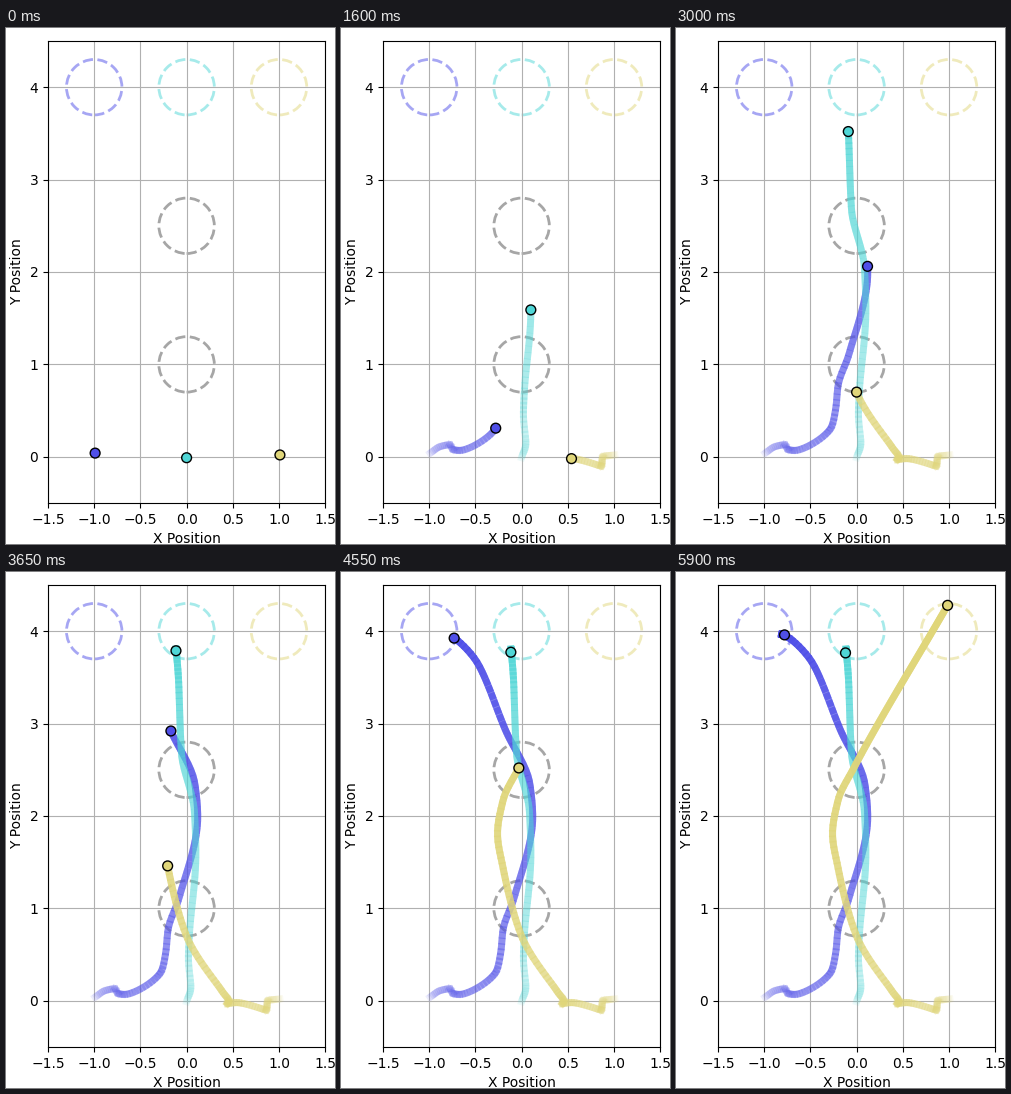
A matplotlib script for the animation above (5950 ms loop, 329 px wide and 516 px high).

```python
import numpy as np
import matplotlib.pyplot as plt
from matplotlib.animation import FuncAnimation
from matplotlib.collections import LineCollection

W, H, DPI = 329, 516, 100
FRAMES, STEP_MS = 119, 50

BLUE = (0.31, 0.31, 0.91)
CYAN = (0.31, 0.84, 0.84)
SAND = (0.88, 0.84, 0.48)
COLORS = [BLUE, CYAN, SAND]

# Waypoints: step, x, y
BLUE_WAY = [
    (0, -.99, .04), (6, -.88, .11), (11, -.78, .13), (15, -.74, .08),
    (19, -.67, .07), (32, -.28, .31), (37, -.225, .53), (41, -.20, .77),
    (47, -.08, 1.12), (59, .12, 1.99), (64, .09, 2.34), (73, -.17, 2.92),
    (84, -.50, 3.69), (91, -.73, 3.925), (96, -.81, 3.965), (118, -.78, 3.96),
]
CYAN_WAY = [
    (0, 0, -.01), (8, .045, .16), (14, .02, .46), (19, .03, .71),
    (32, .10, 1.59), (38, .085, 2.04), (47, -.055, 2.68), (60, -.09, 3.52),
    (69, -.115, 3.81), (75, -.115, 3.78), (118, -.12, 3.765),
]
SAND_WAY = [
    (0, 1.01, .02), (9, .88, 0), (19, .86, -.10), (32, .54, -.02),
    (37, .44, -.03), (41, .455, 0), (47, .38, .11), (60, 0, .70),
    (73, -.205, 1.46), (79, -.26, 1.81), (85, -.20, 2.17), (91, -.03, 2.52),
    (118, .985, 4.28),
]


def glide(points):
    """Monotone cubic curve through timed waypoints, sampled at each step."""
    data = np.array(points, float)
    t, p = data[:, 0], data[:, 1:]
    d = np.diff(p, axis=0) / np.diff(t)[:, None]
    a, b = d[:-1], d[1:]
    same = a * b > 0
    inner = np.where(same, 2 * a * b / np.where(same, a + b, 1), 0)
    slope = np.vstack([d[:1], inner, d[-1:]])
    s = np.arange(FRAMES)
    i = np.clip(np.searchsorted(t, s, side="right") - 1, 0, len(t) - 2)
    h = (t[i + 1] - t[i])[:, None]
    u = (s - t[i])[:, None] / h
    return ((1 + 2 * u) * (1 - u) ** 2 * p[i] + u * (1 - u) ** 2 * h * slope[i]
            + u * u * (3 - 2 * u) * p[i + 1] + u * u * (u - 1) * h * slope[i + 1])


fig = plt.figure(figsize=(W / DPI, H / DPI), dpi=DPI, facecolor="white")
ax = fig.add_axes([42 / W, 41 / H, 277.2 / W, 462 / H])
ax.set(xlim=(-1.5, 1.5), ylim=(-0.5, 4.5), xlabel="X Position",
       ylabel="Y Position", xticks=np.arange(-1.5, 1.6, 0.5),
       yticks=np.arange(5))
ax.grid(True)


def ring(x, y, color, alpha):
    ax.add_patch(plt.Circle((x, y), 0.3, fill=False, ec=color, lw=2,
                            ls="--", alpha=alpha))


for x, color in zip((-1, 0, 1), COLORS):
    ring(x, 4, color, 0.5)
for y in (1, 2.5):
    ring(0, y, "gray", 0.7)

paths = [glide(way) for way in (BLUE_WAY, CYAN_WAY, SAND_WAY)]
segments = [np.stack([p[:-1], p[1:]], axis=1) for p in paths]
fade = np.linspace(0.1, 1, FRAMES - 1)

trails = []
for color in COLORS:
    trail = LineCollection([], colors=[(*color, a) for a in fade],
                           linewidths=5, capstyle="projecting", zorder=2)
    trails.append(ax.add_collection(trail, autolim=False))
dots = ax.scatter([0] * 3, [0] * 3, s=50, c=COLORS, edgecolors="black",
                  linewidths=1, zorder=5)


def draw(k):
    for trail, seg in zip(trails, segments):
        trail.set_segments(seg[:k])
    dots.set_offsets([p[k] for p in paths])
    return [*trails, dots]


anim = FuncAnimation(fig, draw, frames=FRAMES, interval=STEP_MS,
                     repeat=True, repeat_delay=0, blit=False)
plt.show()
```
